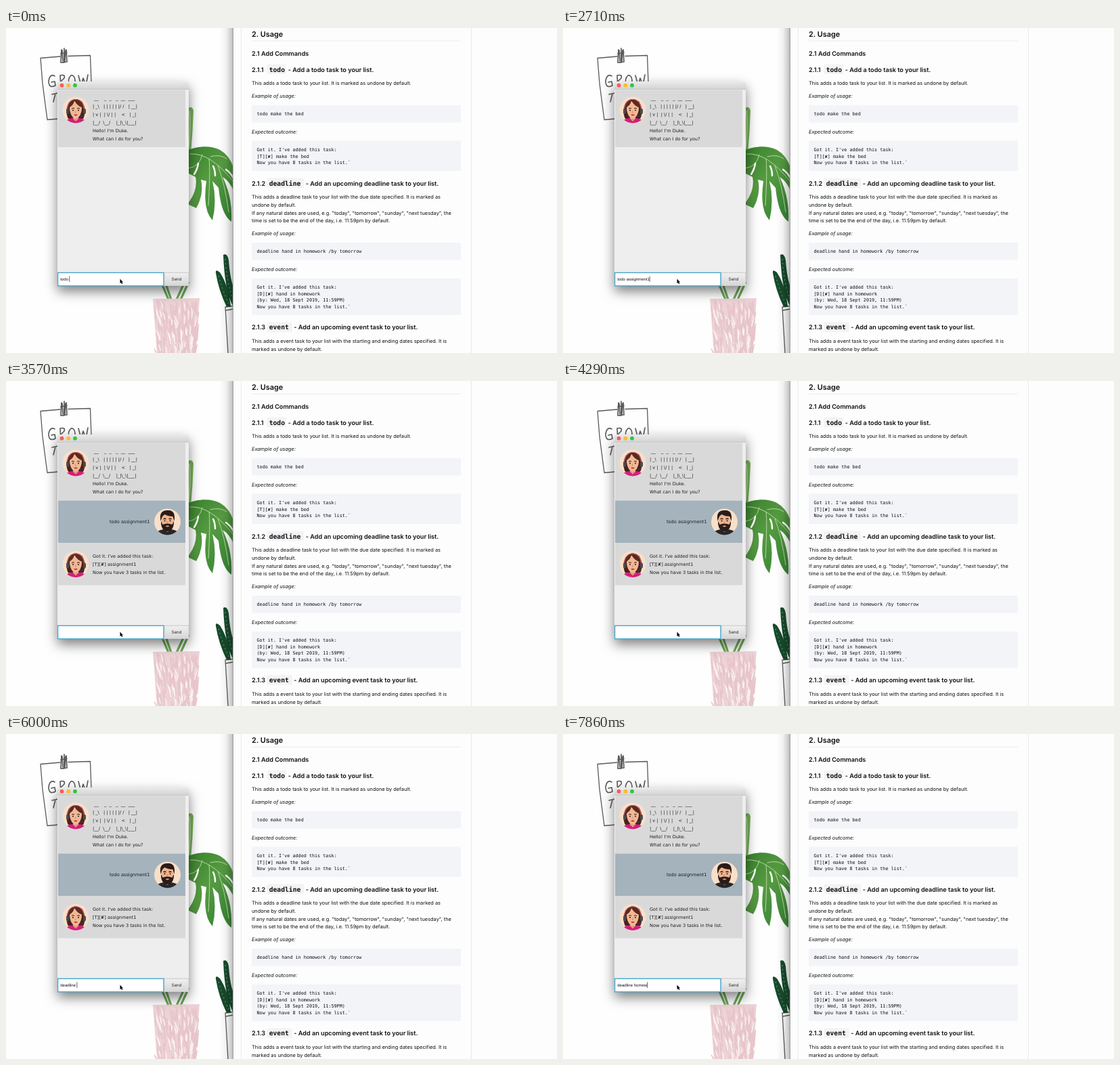
Write an HTML page that moves like this. It is 814 px wide and 480 px high and loops after 8 s.

```html
<!DOCTYPE html>
<html lang="en">
<head>
<meta charset="utf-8">
<title>Task chat demo</title>
<style>
  html, body { margin: 0; width: 100%; height: 100%; overflow: hidden; background: #fefefe; }
  svg { display: block; width: 814px; height: 480px; }
  text { white-space: pre; text-rendering: geometricPrecision; fill: #0d1013; }
  .body { font: 7.4px Inter, sans-serif; }
  .em { font-style: italic; }
  .h2 { font: 600 10.9px Inter, sans-serif; }
  .h3 { font: 600 9.15px Inter, sans-serif; }
  .code { font: 6.78px "DejaVu Sans Mono", monospace; }
  .tag { font: bold 9.7px "DejaVu Sans Mono", monospace; }
  .chat { font: 6.6px "DejaVu Sans", sans-serif; fill: #1c1c1c; }
  .field { font: 6.05px "Liberation Sans", sans-serif; fill: #111; }
  .send { font: 6.1px Inter, sans-serif; fill: #222; }
  .window { filter: drop-shadow(0 8px 9px rgba(0,0,0,.5)); }
  .pencil { fill: none; stroke: #5a5a5a; stroke-width: 1.3; stroke-linecap: round; stroke-linejoin: round; }
</style>
</head>
<body>
<svg viewBox="0 0 814 480">
  <defs>
    <linearGradient id="title" x2="0" y2="1"><stop stop-color="#ebebeb"/><stop offset="1" stop-color="#d2d2d2"/></linearGradient>
    <linearGradient id="button" x2="0" y2="1"><stop stop-color="#f0f0f0"/><stop offset="1" stop-color="#d6d6d6"/></linearGradient>
    <linearGradient id="edge"><stop stop-opacity="0"/><stop offset=".5" stop-opacity=".05"/><stop offset="1" stop-opacity=".24"/></linearGradient>
    <linearGradient id="leaf" x2=".7" y2="1"><stop stop-color="#39802d"/><stop offset=".5" stop-color="#559b41"/><stop offset="1" stop-color="#3b8736"/></linearGradient>
    <clipPath id="disc"><circle r="19.5"/></clipPath>

    <g id="woman" clip-path="url(#disc)">
      <circle r="20" fill="#f8dfc8"/>
      <path d="M-11 13C-16 4-14-16 0-16S16 4 11 13Z" fill="#4b211b"/>
      <path d="M-18 20Q-16 14-5 12H5Q16 14 18 20Z" fill="#d51c7e"/>
      <path d="M-4 8H4V13L0 17L-4 13Z" fill="#dc9c7a"/>
      <path d="M-9-3C-9-10-5-13 0-13S9-10 9-3C9 6 4 13 0 13S-9 6-9-3Z" fill="#f0b995"/>
      <path d="M-2-14C-3-8-6-6-10-3L-11-10L-2-16L10-12L11-3C5-5 1-8-2-14Z" fill="#5b2a20"/>
      <path d="M-6-2Q-4-3.500-2-2M2-2Q4-3.500 6-2" fill="none" stroke="#3a1a14"/>
      <circle cx="-4" cy=".5" r="1" fill="#2a1713"/><circle cx="4" cy=".5" r="1" fill="#2a1713"/>
      <path d="M0 1L-.8 4H1" fill="none" stroke="#c98563" stroke-width=".7"/>
      <path d="M-3 7Q0 6 3 7Q0 10-3 7Z" fill="#cc2138"/>
      <path d="M-12-2C-12-20 12-20 12-2" fill="none" stroke="#c65a6a" stroke-width="1.200"/>
      <path d="M13 4Q13 10 6 10" fill="none" stroke="#3d3d45" stroke-width="1.200"/>
      <rect x="-14" y="-2" width="4" height="8" rx="2" fill="#4b4b54"/><rect x="11" y="-2" width="4" height="8" rx="2" fill="#4b4b54"/>
    </g>
    <g id="man" clip-path="url(#disc)">
      <circle r="20" fill="#f8dfc8"/>
      <path d="M-19 20Q-16 12-5 11H5Q16 12 19 20Z" fill="#26262b"/>
      <path d="M-4 7H4V12L0 15L-4 12Z" fill="#d99a75"/>
      <path d="M-9-4C-9-12-5-14 0-14S9-12 9-4C9 6 5 12 0 12S-9 6-9-4Z" fill="#edb48e"/>
      <path d="M-10-1C-12-12-9-17 0-17C9-18 12-11 10-1L8-8Q1-8-4-11Q-7-9-8-7Z" fill="#2b1b18"/>
      <path d="M-9.500-1L-7 4Q0 1 7 4L9.500-1C10 8 6 14 0 14S-10 8-9.500-1Z" fill="#2b1b18"/>
      <path d="M-3 6Q0 5 3 6Q0 9-3 6Z" fill="#e3a58e"/>
      <path d="M-6-4Q-4-5.500-2-4M2-4Q4-5.500 6-4" fill="none" stroke="#2b1b18" stroke-width="1.300"/>
      <circle cx="-4" cy="-1.500" r="1" fill="#2a1713"/><circle cx="4" cy="-1.500" r="1" fill="#2a1713"/>
      <path d="M0-1L-1 2H1" fill="none" stroke="#c98563" stroke-width=".8"/>
    </g>
  </defs>

  <rect width="814" height="480" fill="#fefefe"/>

  <!-- Wallpaper -->
  <g class="pencil">
    <path d="M80 42L51 44.500L54 82L61 135.500L78 134M92 41.500L124.500 40.500L126 80"/>
    <path d="M82 32L81 51L90 50L89 32M83 33L84 49M86 30V51M88 33L87 49M81 38L90 36" stroke-width="1.700"/>
    <path d="M72 71Q65 67 63 78Q63 90 73 85L72 79L67 80M80 70L81 88M80 70Q88 68 86 74L81 79L88 88M96 70Q90 76 94 84Q102 87 102 77Q101 69 96 70M107 70L111 85L114 74L118 85L121 69M68 98L77 96M73 97L70 109" stroke-width="1.600"/>
    <path d="M324 412L336 410.500M324 412L328 480M325 417L336 415"/>
  </g>
  <path d="M266 185Q269 150 268 119Q275 114 277 122Q276 153 273 185Z" fill="#77b356"/>
  <path d="M271 122Q273 145 270 178" fill="none" stroke="#c4e0ab" stroke-width="1.500"/>
  <path d="M268 181C282 174 303 173 316 180Q330 188 336 206V240Q330 226 320 220Q335 250 333 286Q318 276 314 236L305 226Q312 255 305 284Q290 268 296 226L288 224Q293 245 281 266L268 260Q284 240 280 220L268 214Z" fill="url(#leaf)"/>
  <g fill="none" stroke="#b7d8a3" stroke-linecap="round">
    <path d="M272 186Q302 184 335 226M290 187Q286 205 270 207M300 193Q302 212 299 262M313 203Q323 229 329 272M302 190Q316 186 326 193"/>
    <path d="M278 216Q283 208 284 200M309 218Q309 210 306 204M325 209Q332 214 336 222" stroke="#fefefe" stroke-width="2.500"/>
  </g>
  <path d="M229 375L240 401M235 375L244 401M270 375L258 401M264 375L252 401" stroke="#6ba656" stroke-width="3.200"/>
  <path d="M321 335Q327 332 329 343Q331 370 336 382V412Q323 389 321 335ZM310 362Q309 355 316 361Q329 381 332 412H326Q314 387 310 362Z" fill="#174a2c"/>
  <path d="M324 341Q326 372 334 398M314 366Q320 388 329 407" fill="none" stroke="#7da680" stroke-width="1" stroke-dasharray="2 4"/>
  <path d="M217 400L286 399L280 480H223Z" fill="#edd3d6"/>
  <path id="scribble" fill="none" stroke="#e7c5ca" stroke-width="1.400" stroke-linejoin="round"/>
  <path id="gaps" fill="none" stroke="#fbf3f4" stroke-width="1"/>

  <!-- Guide page -->
  <rect x="315" width="20" height="480" fill="url(#edge)"/>
  <rect x="335" width="479" height="480" fill="#fdfdfd"/>
  <path d="M335.300 0V480" stroke="#858585" stroke-width=".9"/>
  <path d="M347.500 0V480M687.500 0V480M363 19H672" stroke="#e8eaee"/>
  <g id="guide"></g>

  <!-- Chat window -->
  <g class="window">
    <path d="M76 381V83Q76 79 80 79H266Q270 79 270 83V381Z" fill="#eee"/>
  </g>
  <path d="M76 90.500V83Q76 79 80 79H266Q270 79 270 83V90.500Z" fill="url(#title)"/>
  <path d="M76 90.500H270" stroke="#bcbcbc" stroke-width=".7"/>
  <circle cx="82.500" cy="84.700" r="2.900" fill="#fc5b54"/>
  <circle cx="92.300" cy="84.700" r="2.900" fill="#fcbb30"/>
  <circle cx="102" cy="84.700" r="2.900" fill="#30c544"/>
  <rect x="77" y="91.500" width="188" height="84.500" fill="#d9d9d9"/>
  <use href="#woman" x="103" y="121"/>
  <g id="greeting"></g>
  <g id="exchange">
    <rect x="77" y="176.500" width="188" height="62.500" fill="#a5b3bd"/>
    <rect x="77" y="239" width="188" height="62.500" fill="#d9d9d9"/>
    <use href="#man" x="238.500" y="208"/>
    <use href="#woman" x="103" y="270.500"/>
    <text class="chat" x="153" y="210.300">todo assignment1</text>
    <g id="reply"></g>
  </g>
  <rect x="76" y="360.500" width="194" height="20.500" fill="#dcdcdc"/>
  <rect x="234" y="361.500" width="36" height="19" fill="url(#button)" stroke="#c4c4c4" stroke-width=".6"/>
  <text class="send" x="244.500" y="373.200">Send</text>
  <rect x="76.600" y="361.400" width="156.300" height="19.400" fill="#fff" stroke="#42a7cf" stroke-width="1.300"/>
  <text class="field" id="field" x="80.200" y="373"></text>
  <rect id="caret" y="366.500" width=".7" height="8.500" fill="#222"/>
  <path d="M168.500 370.500V377.300L170.100 375.900L171.200 378.300L172.300 377.800L171.200 375.500H173Z" stroke="#fff" stroke-width=".8" paint-order="stroke"/>
</svg>

<script>
const $ = id => document.getElementById(id);
const line = (cls, x, y, text) => `<text class="${cls}" x="${x}" y="${y}">${text}</text>`;
const lines = (cls, x, y, step, rows) => rows.map((row, i) => line(cls, x, y + i * step, row)).join('');

// Guide text
const body = (y, ...rows) => lines('body', 363, y, 11.7, rows);
const label = (y, text) => line('body em', 363, y, text);
const codeBox = (y, h, ...rows) =>
  `<rect x="363" y="${y}" width="309" height="${h}" rx="1.500" fill="#f3f4f8"/>` +
  lines('code', 370.5, y + 15.4, 9.65, rows);
const command = (y, number, tag, pillWidth, title) =>
  line('h3', 363, y, number) +
  `<rect x="385.500" y="${y - 11}" width="${pillWidth}" height="14.500" rx="1.500" fill="#f3f3f4"/>` +
  line('tag', 388.7, y, tag) + line('h3', 388.2 + pillWidth, y, title);

$('guide').innerHTML =
  line('h2', 363, 12.5, '2. Usage') +
  line('h3', 363, 40.8, '2.1 Add Commands') +
  command(64.6, '2.1.1', 'todo', 28.5, '- Add a todo task to your list.') +
  body(84, 'This adds a todo task to your list. It is marked as undone by default.') +
  label(103.4, 'Example of usage:') +
  codeBox(114, 25.5, 'todo make the bed') +
  label(156, 'Expected outcome:') +
  codeBox(166.5, 44.5, "Got it. I've added this task:", '[T][✘] make the bed', 'Now you have 8 tasks in the list.`') +
  command(232.8, '2.1.2', 'deadline', 54.5, '- Add an upcoming deadline task to your list.') +
  body(252.2, 'This adds a deadline task to your list with the due date specified. It is marked as', 'undone by default.',
    'If any natural dates are used, e.g. "today", "tomorrow", "sunday", "next tuesday", the',
    'time is set to be the end of the day, i.e. 11.59pm by default.') +
  label(306.4, 'Example of usage:') +
  codeBox(317, 25.5, 'deadline hand in homework /by tomorrow') +
  label(359, 'Expected outcome:') +
  codeBox(369.7, 54, "Got it. I've added this task:", '[D][✘] hand in homework',
    '(by: Wed, 18 Sept 2019, 11:59PM)', 'Now you have 8 tasks in the list.`') +
  command(445.4, '2.1.3', 'event', 37, '- Add an upcoming event task to your list.') +
  body(465, 'This adds a event task to your list with the starting and ending dates specified. It is', 'marked as undone by default.');

// Chat text
$('greeting').innerHTML =
  lines('chat', 128, 105.6, 12.05, [
    ' __    _  _   _  __  ___',
    '| _\\   | | | | | |/ /   | __|',
    '| v |  | \\/ | |    &lt;   | _|',
    '|__/  \\__/    |_|\\_\\|___|',
    "Hello! I'm Duke.",
    'What can I do for you?']);
$('reply').innerHTML =
  lines('chat', 128, 260.6, 12.1, ["Got it. I've added this task:", '[T][✘] assignment1', 'Now you have 3 tasks in the list.']);

// Crayon strokes on the pot
let seed = 7;
const random = () => (seed = seed * 16807 % 2147483647) / 2147483647;
const strokes = (count, length) => Array.from({ length: count }, () => {
  const u = random(), y = 400 + random() * 80, x = 219 + u * 64;
  const end = Math.min(480, y + length * (.5 + random()));
  return `M${x} ${y}L${x + (0.5 - u) * 5 + random() * 3} ${end}L${x + 2} ${y + 3}`;
}).join('');
$('scribble').setAttribute('d', strokes(110, 24));
$('gaps').setAttribute('d', strokes(45, 12));

// Typing
const LOOP = 8000, SENT = 2860, BLINK = 475;
const drafts = [
  { text: 'todo assignment1', start: 5, keys: [860, 1000, 1140, 1570, 1710, 1860, 2000, 2140, 2290, 2430, 2570] },
  { text: 'deadline homew', start: 0, keys: [4710, 5000, 5140, 5290, 5570, 5710, 5860, 6000, 6000, 7140, 7290, 7430, 7570, 7710] }
];

function draw() {
  const t = performance.now() % LOOP, sent = t >= SENT;
  const { text, start, keys } = drafts[+sent];
  const pressed = keys.filter(k => k <= t);
  const lastInput = pressed.at(-1) ?? (sent ? SENT : 0);
  $('exchange').style.display = sent ? '' : 'none';
  $('field').textContent = text.slice(0, start + pressed.length);
  $('caret').setAttribute('x', 80 + $('field').getComputedTextLength());
  $('caret').style.display = (t - lastInput) % (2 * BLINK) < BLINK ? '' : 'none';
  requestAnimationFrame(draw);
}
draw();
</script>
</body>
</html>
```
